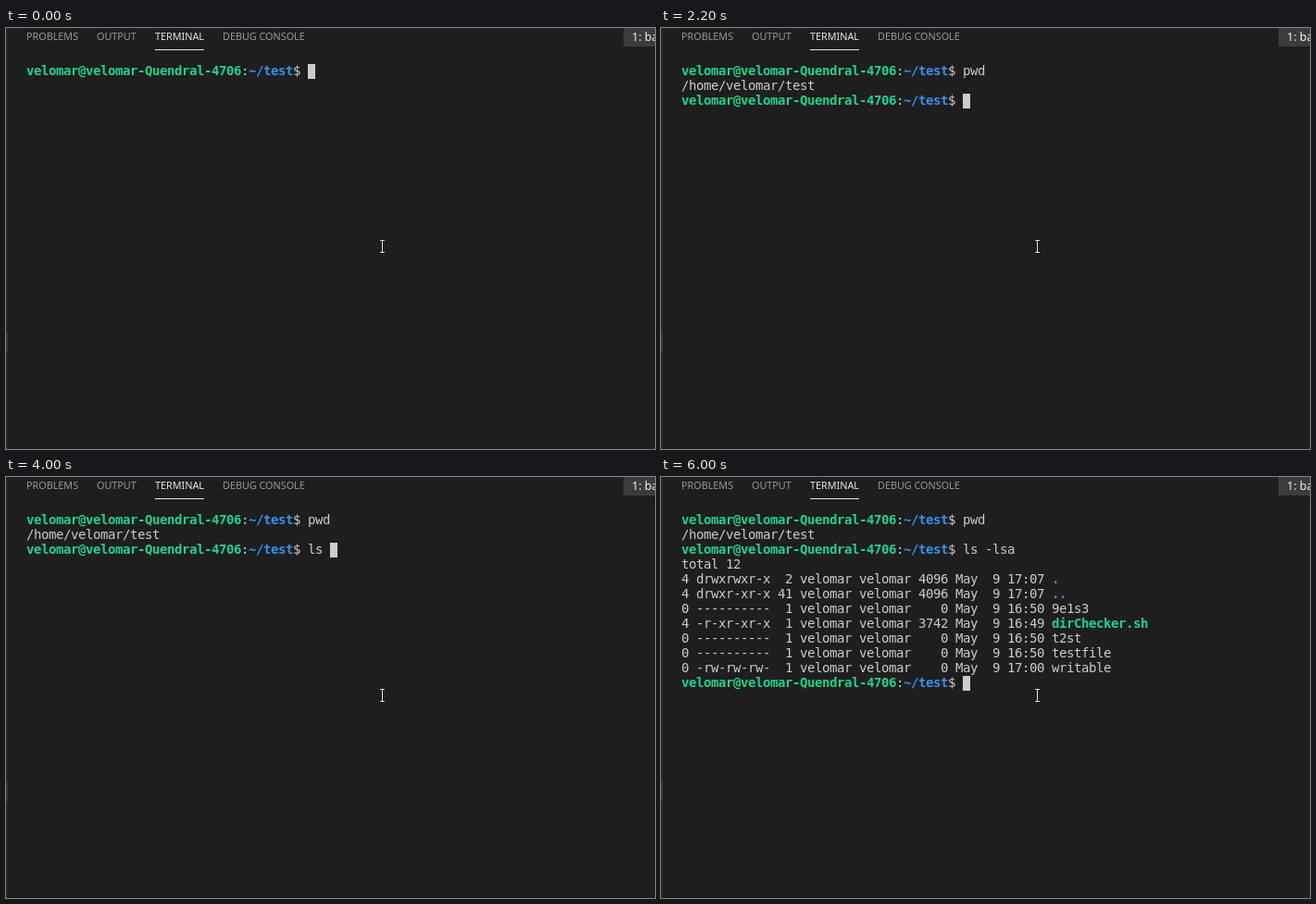
An HTML page with a canvas that plays this animation: 701x455 px, repeating every 8 s.

```html
<!DOCTYPE html>
<html lang="en">
<head>
<meta charset="utf-8">
<title>Terminal session</title>
<style>
  html, body { margin: 0; width: 100%; height: 100%; overflow: hidden; background: #1e1e1e; }
  canvas { display: block; }
</style>
</head>
<body>
<canvas id="stage" width="701" height="455"></canvas>
<script>
// An opaque canvas lets the browser use subpixel text smoothing.
const ctx = document.getElementById("stage").getContext("2d", { alpha: false });
const LOOP = 8000;
const CELL_W = 8, CELL_H = 16, LEFT = 22, TOP = 39;
const FG = "#cccccc", GREEN = "#23d18b", BLUE = "#3b8eea";
const MONO = '14px "DejaVu Sans Mono", monospace';
const UI = '"Noto Sans", "Open Sans", sans-serif';

const USER = "velomar";
const HOST = USER + "-Quendral-4706";

// A line is a list of [text, colour, bold] spans.
const plain = text => [[text, FG]];
const prompt = typed => [
  [USER + "@" + HOST, GREEN, true], [":", FG], ["~/test", BLUE, true], ["$ " + typed, FG]
];
const entry = (blocks, mode, links, size, time, name, colour = FG) => [
  [`${blocks} ${mode} ${String(links).padStart(2)} ${USER} ${USER} ` +
   `${String(size).padStart(4)} May  9 ${time} `, FG],
  [name, colour, colour !== FG]
];

const pwdOutput = [prompt("pwd"), plain(`/home/${USER}/test`)];
const listing = [
  plain("total 12"),
  entry(4, "drwxrwxr-x", 2, 4096, "17:07", ".", BLUE),
  entry(4, "drwxr-xr-x", 41, 4096, "17:07", "..", BLUE),
  entry(0, "----------", 1, 0, "16:50", "9e1s3"),
  entry(4, "-r-xr-xr-x", 1, 3742, "16:49", "dirChecker.sh", GREEN),
  entry(0, "----------", 1, 0, "16:50", "t2st"),
  entry(0, "----------", 1, 0, "16:50", "testfile"),
  entry(0, "-rw-rw-rw-", 1, 0, "17:00", "writable")
];

// [start time, finished lines, text typed at the prompt]
const steps = [
  [0, [], ""],
  [800, [], "p"],
  [1000, [], "pwd"],
  [2200, pwdOutput, ""],
  [3500, pwdOutput, "l"],
  [3700, pwdOutput, "ls"],
  [4000, pwdOutput, "ls "],
  [4300, pwdOutput, "ls -l"],
  [4600, pwdOutput, "ls -lsa"],
  [6000, [...pwdOutput, prompt("ls -lsa"), ...listing], ""]
];

function rect(x, y, w, h, colour) {
  ctx.fillStyle = colour;
  ctx.fillRect(x, y, w, h);
}

function label(text, x, y, size, colour) {
  ctx.font = `${size}px ${UI}`;
  ctx.fillStyle = colour;
  ctx.fillText(text, x, y);
}

// Draws each character in its own cell and returns the next free column.
function drawLine(spans, row) {
  let col = 0;
  for (const [text, colour, bold] of spans) {
    ctx.font = (bold ? "bold " : "") + MONO;
    ctx.fillStyle = colour;
    for (const ch of text) {
      ctx.fillText(ch, LEFT + col++ * CELL_W, TOP + row * CELL_H + 12);
    }
  }
  return col;
}

function drawPanel() {
  rect(0, 0, 701, 455, "#1e1e1e");
  rect(0, 0, 2, 455, "#252526");
  rect(0, 329, 2, 22, "#37373d");

  const tabs = [["PROBLEMS", 22], ["OUTPUT", 98], ["TERMINAL", 161], ["DEBUG CONSOLE", 234]];
  for (const [name, x] of tabs) {
    label(name, x, 13, 10.8, name === "TERMINAL" ? "#e7e7e7" : "#979797");
  }
  rect(161, 23, 53, 1, "#e7e7e7");

  rect(667, 0, 34, 20, "#3c3c3c");
  label("1: bash", 676, 14, 12.5, "#f0f0f0");
}

function drawPointer() {
  const bars = [[404, 229, 5, 1], [406, 230, 1, 12], [404, 242, 5, 1]];
  for (const [x, y, w, h] of bars) rect(x - 1, y - 1, w + 2, h + 2, "#111111");
  for (const bar of bars) rect(...bar, "#eeeeee");
}

function draw(time) {
  const [, lines, typed] = steps.findLast(([start]) => start <= time);
  drawPanel();
  lines.forEach(drawLine);
  const row = lines.length;
  const col = drawLine(prompt(typed), row);
  rect(LEFT + col * CELL_W, TOP + row * CELL_H, CELL_W, CELL_H, FG);
  drawPointer();
}

const begin = performance.now();
function tick() {
  draw((performance.now() - begin) % LOOP);
  requestAnimationFrame(tick);
}
tick();
</script>
</body>
</html>
```
